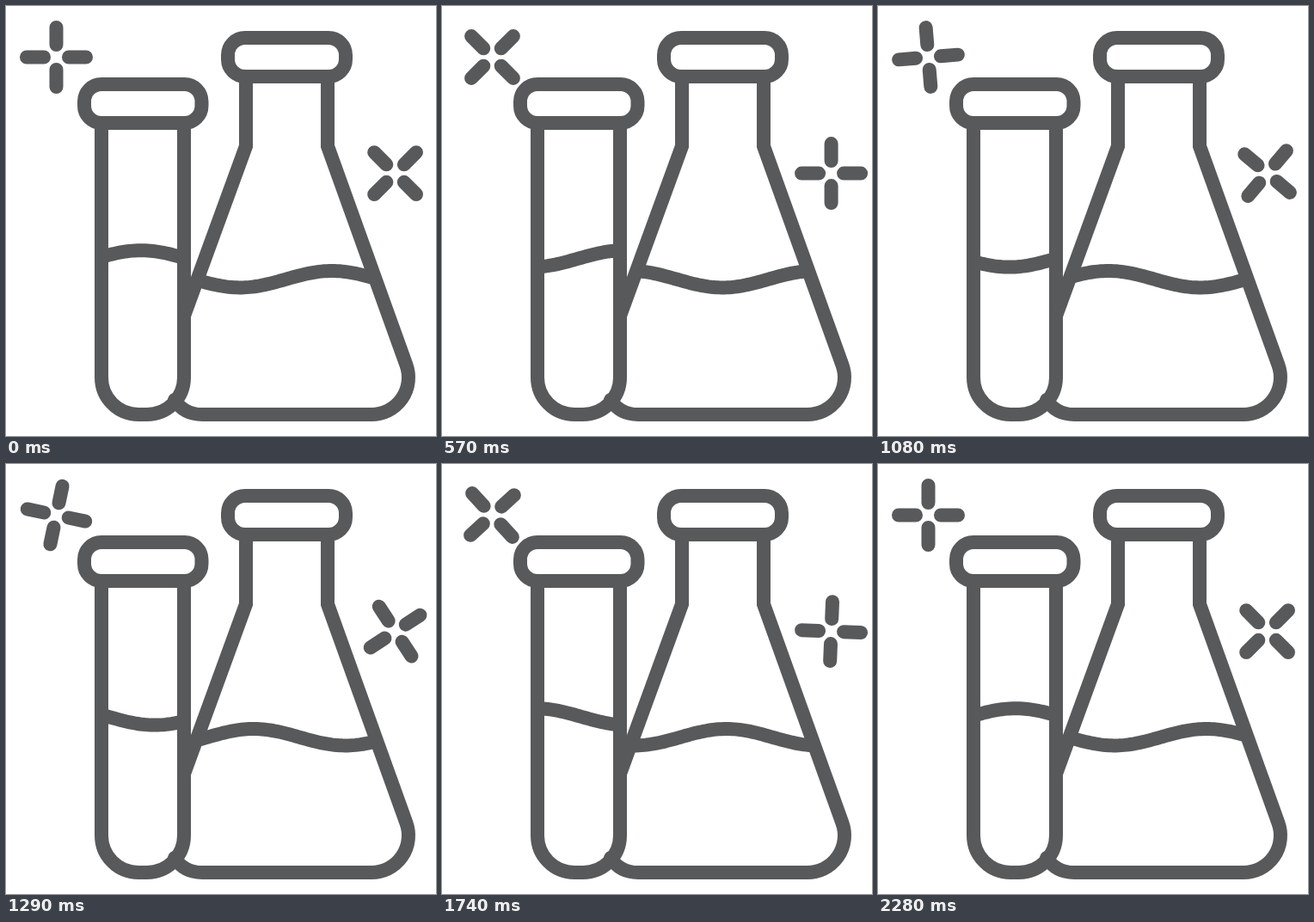
An HTML page that plays this animation: 500 by 500 pixels, repeating every 2310 ms.

```html
<!DOCTYPE html>
<html lang="en">
<head>
<meta charset="utf-8">
<title>Test tube and flask</title>
<style>
  html, body { margin: 0; width: 100%; height: 100%; overflow: hidden; background: #fff; }
  svg { display: block; width: 100%; height: 100%; }
</style>
</head>
<body>
<svg viewBox="0 0 500 500" fill="none" stroke="#58595b" stroke-width="16">
  <defs>
    <clipPath id="inTube"><path d="M111 200H207V400H111Z"/></clipPath>
    <clipPath id="inFlask"><path d="M279 163H374L460 399H193Z"/></clipPath>
    <path id="spark" stroke-linecap="round" d="M0-14.500V-34.500M14.500 0H34.500M0 14.500V34.500M-14.500 0H-34.500"/>
  </defs>

  <!-- tube -->
  <rect x="91" y="91" width="136.500" height="45" rx="20"/>
  <path d="M111 136V432A43 43 0 0 0 154 475H164A43 43 0 0 0 207 432V136"/>
  <path id="tubeWave" clip-path="url(#inTube)"/>

  <!-- flask -->
  <rect x="258" y="37" width="137" height="45" rx="20"/>
  <path d="M279 82V163L207.500 359"/>
  <path d="M374 82V163L465.400 417.300A43 43 0 0 1 425 475H228"/>
  <path stroke-linecap="round" d="M228 475Q207 475 196 458"/>
  <path id="flaskWave" clip-path="url(#inFlask)"/>

  <use id="sparkLeft" href="#spark"/>
  <use id="sparkRight" href="#spark"/>
</svg>
<script>
const LOOP = 2310, STEP = 30, TRAVEL = 2280;
const WAVELENGTH = 214, AMPLITUDE = 9.7, SHIFT = 217;
const byId = id => document.getElementById(id);

function drawWave(id, from, to, midY, crestX) {
  const points = [];
  for (let x = from; x <= to; x += 3) {
    const y = midY - AMPLITUDE * Math.cos(2 * Math.PI * (x - crestX) / WAVELENGTH);
    points.push(`${x} ${y.toFixed(2)}`);
  }
  byId(id).setAttribute('d', 'M' + points.join('L'));
}

function placeSpark(id, x, y, angle) {
  byId(id).setAttribute('transform', `translate(${x} ${y}) rotate(${angle})`);
}

function render(now) {
  const time = Math.floor(now % LOOP / STEP) * STEP;
  const progress = time / TRAVEL;
  const shift = SHIFT * progress;
  const angle = 180 * progress;
  drawWave('tubeWave', 105, 215, 293.9, 157 + shift);
  drawWave('flaskWave', 190, 460, 317.7, 379 + shift);
  placeSpark('sparkLeft', 58.5, 59.5, angle);
  placeSpark('sparkRight', 452.6, 194.6, angle + 45);
}

let start;
function tick(now) {
  start ??= now;
  render(now - start);
  requestAnimationFrame(tick);
}
render(0);
requestAnimationFrame(tick);
</script>
</body>
</html>
```
